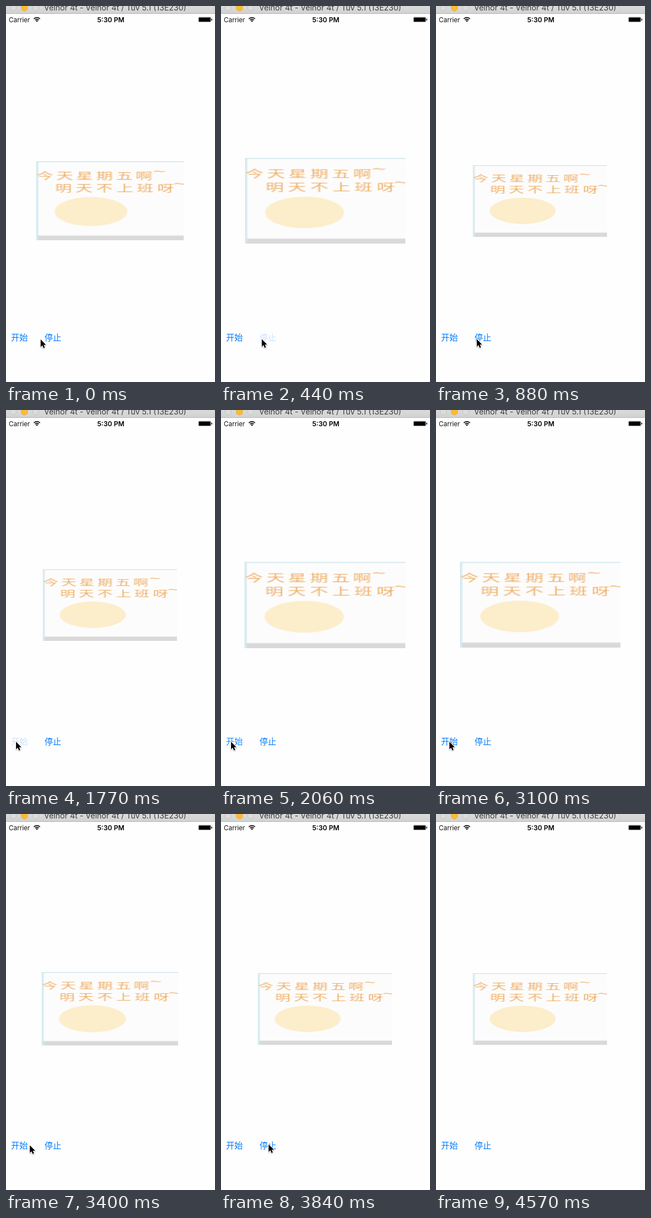
Write an HTML page with a canvas that moves like this. It is 374 by 671 pixels and loops after 4980 ms.

```html
<!DOCTYPE html>
<html lang="zh-CN">
<head>
<meta charset="utf-8">
<title>Pulse demo</title>
<style>
html, body { margin: 0; width: 100%; height: 100%; overflow: hidden; background: #fefefe; }
canvas { display: block; width: 374px; height: 671px; }
</style>
</head>
<body>
<canvas id="stage"></canvas>
<script>
const W = 374, H = 671, LOOP = 4980, STEP = 147.5;
const UI = 'Inter, Roboto, sans-serif';
const CJK = '"Noto Sans CJK SC", "Noto Sans CJK", sans-serif';
const canvas = document.getElementById('stage');
const ctx = canvas.getContext('2d');
const dpr = window.devicePixelRatio || 1;
canvas.width = W * dpr;
canvas.height = H * dpr;

// Time spans in which the picture pulses, with the time of one peak.
const runs = [
  { from: 0, to: 520, peak: 423, period: 560 },
  { from: 1810, to: 4050, peak: 3085, period: 510 }
];

// Cursor stops: time, x, y of the tip.
const path = [
  [0, 62, 595], [440, 73, 594.5], [1200, 73, 594.5], [1620, 18, 592],
  [2510, 18, 592], [3100, 24, 592], [3250, 25.5, 592], [3690, 78.5, 590],
  [3840, 85.5, 589.5], [4130, 85.5, 589.5], [4560, 96, 690], [LOOP, 96, 690]
];

function pulse(t) {
  const run = runs.find(r => t >= r.from && t < r.to);
  if (!run) return 1;
  return 1.1 + 0.1 * Math.cos(2 * Math.PI * (t - run.peak) / run.period);
}

function cursorAt(t) {
  const i = Math.max(1, path.findIndex(p => p[0] >= t));
  const [t0, x0, y0] = path[i - 1], [t1, x1, y1] = path[i];
  const k = (t - t0) / (t1 - t0);
  return [x0 + (x1 - x0) * k, y0 + (y1 - y0) * k];
}

// Opacity of a button held from down to up.
function held(t, down, up) {
  if (t < down) return 1;
  if (t < up) return 0.2;
  return Math.min(1, 0.2 + 0.8 * (t - up) / 300);
}

function text(c, s, x, y, font, color, align = 'left') {
  c.font = font;
  c.fillStyle = color;
  c.textAlign = align;
  c.fillText(s, x, y);
}

function disc(x, y, r, fill, stroke) {
  ctx.beginPath();
  ctx.arc(x, y, r, 0, 7);
  ctx.fillStyle = fill;
  ctx.fill();
  ctx.strokeStyle = stroke;
  ctx.lineWidth = 1;
  ctx.stroke();
}

// Small square picture, enlarged and widened when shown.
const pic = makePicture();

function makePicture() {
  const cv = document.createElement('canvas');
  cv.width = cv.height = 128;
  const c = cv.getContext('2d');
  const orange = '#efb068';
  const box = (color, x, y, w, h) => { c.fillStyle = color; c.fillRect(x, y, w, h); };
  const line = (s, x, y, pitch) => {
    c.textBaseline = 'middle';
    [...s].forEach((ch, i) => text(c, ch, x + i * pitch, y, '500 14.5px ' + CJK, orange, 'center'));
  };
  const tilde = (x, y) => {
    c.beginPath();
    c.moveTo(x, y + 1.2);
    c.bezierCurveTo(x + 3, y - 3, x + 6, y + 4, x + 9, y);
    c.strokeStyle = orange;
    c.lineWidth = 1.2;
    c.stroke();
  };
  box('#fdfcfc', 0, 0, 128, 128);
  box('#d9d9d9', 0, 120.5, 128, 7.5);
  box('#d3eaf0', 0, 0, 128, 1.5);
  box('#d3eaf0', 0, 0, 1.7, 128);
  line('今天星期五啊', 7.6, 23, 17.2);
  line('明天不上班呀', 23.8, 43, 17.7);
  tilde(102.5, 16);
  tilde(120, 36);
  c.beginPath();
  c.ellipse(47.5, 81.5, 31.5, 23.5, 0, 0, 7);
  c.fillStyle = '#fcedcb';
  c.fill();
  return cv;
}

function drawBars() {
  const g = ctx.createLinearGradient(0, 0, 0, 13);
  g.addColorStop(0, '#dadada');
  g.addColorStop(1, '#d2d2d2');
  ctx.fillStyle = g;
  ctx.fillRect(0, 0, W, 13);
  ctx.fillStyle = '#b4b4b4';
  ctx.fillRect(0, 13, W, 1);
  disc(13, 3, 5.7, '#dcdcdc', '#c3c3c3');
  disc(33, 3, 5.7, '#fdbc2e', '#e6a935');
  disc(53, 3, 5.7, '#dcdcdc', '#c3c3c3');
  text(ctx, 'Velnor 4t - Velnor 4t / Tuv 5.1 (13E230)', 68, 8, '14px ' + UI, '#3e3e3e');
  text(ctx, 'Carrier', 5, 28.5, '11.6px ' + UI, '#111');
  text(ctx, '5:30 PM', 187.5, 28.5, '600 12px ' + UI, '#000', 'center');
  drawWifi(55.3, 28.6);
  drawBattery(344, 19.5);
}

function drawWifi(x, y) {
  ctx.strokeStyle = ctx.fillStyle = '#000';
  ctx.lineWidth = 1.7;
  for (const r of [4.8, 7.9]) {
    ctx.beginPath();
    ctx.arc(x, y, r, -Math.PI * 0.75, -Math.PI * 0.25);
    ctx.stroke();
  }
  ctx.beginPath();
  ctx.moveTo(x, y);
  ctx.arc(x, y, 2.8, -Math.PI * 0.75, -Math.PI * 0.25);
  ctx.fill();
}

function drawBattery(x, y) {
  ctx.strokeStyle = '#8a8a8a';
  ctx.lineWidth = 0.6;
  ctx.beginPath();
  ctx.roundRect(x + 0.3, y + 0.3, 22.4, 8.9, 1.8);
  ctx.stroke();
  ctx.fillStyle = '#000';
  ctx.beginPath();
  ctx.roundRect(x + 1, y + 1, 21, 7.5, 0.8);
  ctx.roundRect(x + 23.4, y + 3, 1.5, 3.5, 0.7);
  ctx.fill();
}

function drawButton(label, x, alpha) {
  ctx.globalAlpha = alpha;
  text(ctx, label, x, 596.6, '15px ' + CJK, '#007aff');
  ctx.globalAlpha = 1;
}

const arrow = new Path2D('M0 0V13.4L3 10.6L5.2 15.5L7.5 14.5L5.4 9.7H9.5Z');

function drawCursor(x, y) {
  ctx.save();
  ctx.translate(x, y);
  ctx.shadowColor = 'rgba(0,0,0,.3)';
  ctx.shadowBlur = 2 * dpr;
  ctx.shadowOffsetY = dpr;
  ctx.strokeStyle = '#fff';
  ctx.lineWidth = 1.8;
  ctx.lineJoin = 'round';
  ctx.stroke(arrow);
  ctx.shadowColor = 'transparent';
  ctx.fillStyle = '#000';
  ctx.fill(arrow);
  ctx.restore();
}

function draw(t) {
  ctx.setTransform(dpr, 0, 0, dpr, 0, 0);
  ctx.fillStyle = '#fefefe';
  ctx.fillRect(0, 0, W, H);
  drawBars();
  const s = pulse(t), w = Math.round(239.6 * s), h = Math.round(128 * s);
  ctx.drawImage(pic, Math.round(186.3 - w / 2), Math.round(347.7 - h / 2), w, h);
  drawButton('开始', 9, held(t, 1600, 1810));
  drawButton('停止', 69, t < 1000 ? held(t, 280, 520) : held(t, 3900, 4050));
  drawCursor(...cursorAt(t));
}

function tick() {
  const t = performance.now() % LOOP;
  draw(Math.min(31, Math.floor((t + 5) / STEP)) * STEP);
  requestAnimationFrame(tick);
}
tick();
</script>
</body>
</html>
```
